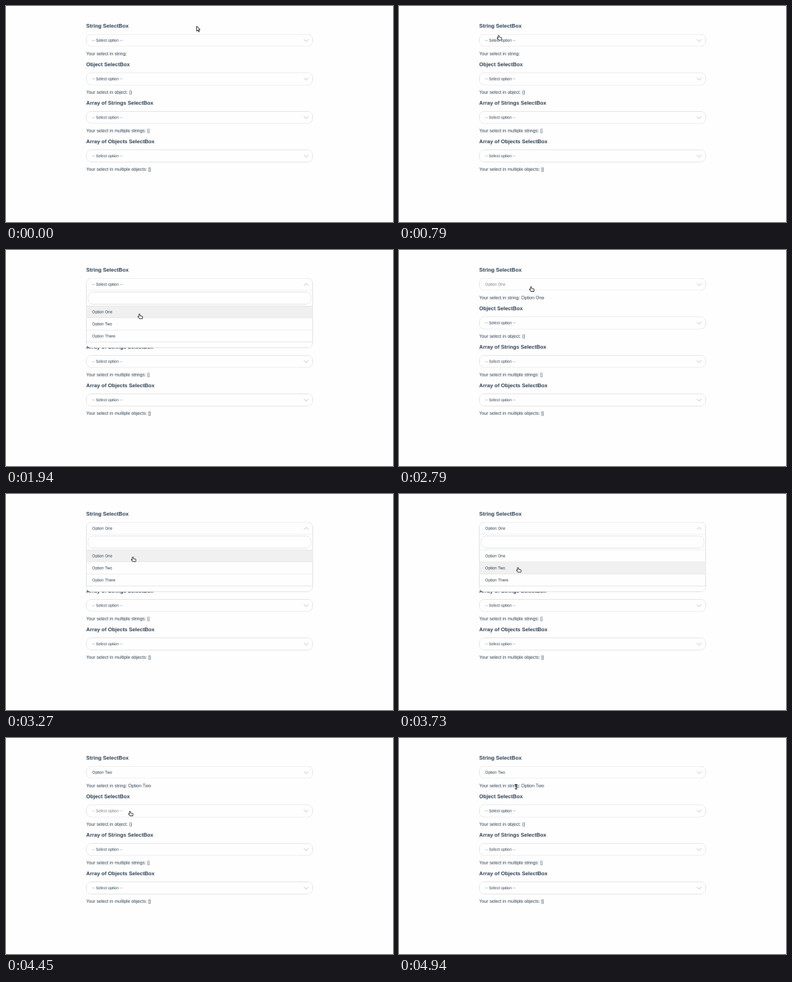
Animation of 600x337 px, one loop 5000 ms. Source, as an HTML page with a canvas:

```html
<!DOCTYPE html>
<html lang="en">
<head>
<meta charset="utf-8">
<title>Select boxes</title>
<style>
  html, body { margin: 0; width: 100%; height: 100%; overflow: hidden; background: #fefefe; }
  canvas { display: block; width: 600px; height: 337px; }
</style>
</head>
<body>
<canvas id="stage"></canvas>
<script>
// The page is laid out at desktop size, then shrunk to the stage.
const W = 1366, H = 768, LOOP = 5000, TICK = 66;
const PAGE = '#fefefe', INK = '#2c3e50', LINE = '#ccc';
const LEFT = 283.5, WIDTH = 799, TOP = 100.5, BOX_H = 43, PITCH = 137;
const ROW_TOP = 198.5, ROW_H = 43, LIST_END = 347.5;
const EMPTY = '-- Select option --';
const OPTIONS = ['Option One', 'Option Two', 'Option There'];
const FIELDS = [
  ['String SelectBox', 'Your select in string: '],
  ['Object SelectBox', 'Your select in object: {}'],
  ['Array of Strings SelectBox', 'Your select in multiple strings: []'],
  ['Array of Objects SelectBox', 'Your select in multiple objects: []']
];

// Each click opens or closes the first box.
const CLICKS = [1330, 2390, 3060, 3880];

const HOME = { x: 673, y: 72 };
const MOVES = [
  { from: 60, to: 450, x: 373, y: 105 },
  { from: 450, to: 550, x: 355, y: 87 },
  { from: 610, to: 1060, x: 350, y: 112 },
  { from: 1400, to: 1790, x: 412, y: 178 },
  { from: 1860, to: 1940, x: 471, y: 227 },
  { from: 2000, to: 2210, x: 476, y: 226 },
  { from: 2450, to: 2790, x: 466, y: 130 },
  { from: 3130, to: 3550, x: 433, y: 298 },
  { from: 3560, to: 3730, x: 420, y: 261 },
  { from: 4210, to: 4400, x: 512, y: 266 },
  { from: 4400, to: 4600, x: 378, y: 255 },
  { from: 4600, to: 4730, x: 402, y: 221 },
  { from: 4750, to: 4940, x: 413, y: 173 }
];

const stage = document.getElementById('stage');
const dpr = window.devicePixelRatio || 1;
stage.width = 600 * dpr;
stage.height = 337 * dpr;
const out = stage.getContext('2d');
out.imageSmoothingQuality = 'medium';

const page = document.createElement('canvas');
page.width = W;
page.height = H;
const ctx = page.getContext('2d');

const hand = new Path2D('M-2 2Q0-1 2 2L2 7L9 8Q11 9 11 11L10 17L0 17L-5 11Q-6 8-3 9L-2 10Z');
const arrow = new Path2D('M0 0L0 17L4 13.5L7 20L10 18.5L7 12.5L12 12Z');
const beam = new Path2D('M-4-8L-1-8L0-7L1-8L4-8M0-7L0 7M-4 8L-1 8L0 7L1 8L4 8');

const clamp = u => Math.max(0, Math.min(1, u));

function pointerAt(t) {
  let p = HOME;
  for (const m of MOVES) {
    if (t < m.from) break;
    const span = m.to - m.from, steps = Math.round(span / TICK);
    const u = clamp(Math.floor((t - m.from) / span * steps + 0.3) / steps);
    const k = 1 - (1 - u) ** 2;
    p = { x: p.x + (m.x - p.x) * k, y: p.y + (m.y - p.y) * k };
  }
  return p;
}

// Half turns of the first chevron, one per click
function chevronTurn(t) {
  return CLICKS.reduce((sum, click) => {
    const u = clamp((Math.floor((t - click) / 60) * 60 - 20) / 160);
    return sum + u * u * (3 - 2 * u);
  }, 0);
}

function boxAt(p) {
  if (p.x < LEFT || p.x > LEFT + WIDTH) return -1;
  return FIELDS.findIndex((_, i) => p.y >= TOP + i * PITCH && p.y <= TOP + i * PITCH + BOX_H);
}

function text(s, x, y, size, color, weight = 'normal') {
  ctx.font = `${weight} ${size}px "Liberation Sans", Arial, sans-serif`;
  ctx.fillStyle = color;
  ctx.fillText(s, x, y);
  return ctx.measureText(s).width;
}

function pill(x, y, w, h) {
  ctx.beginPath();
  ctx.roundRect(x, y, w, h, 18);
  ctx.fillStyle = PAGE;
  ctx.fill();
  ctx.strokeStyle = LINE;
  ctx.lineWidth = 1;
  ctx.stroke();
}

function rule(y) {
  ctx.beginPath();
  ctx.moveTo(LEFT, y);
  ctx.lineTo(LEFT + WIDTH, y);
  ctx.stroke();
}

function chevron(y, turn) {
  ctx.save();
  ctx.translate(1059.5, y);
  ctx.rotate(turn * Math.PI);
  ctx.beginPath();
  ctx.moveTo(-8, -4);
  ctx.lineTo(0, 4);
  ctx.lineTo(8, -4);
  ctx.strokeStyle = LINE;
  ctx.lineWidth = 2;
  ctx.stroke();
  ctx.restore();
}

function dropdown(p) {
  pill(LEFT, TOP, WIDTH, LIST_END - TOP);
  rule(TOP + BOX_H);
  pill(289.5, 149.5, 787, 43);
  OPTIONS.forEach((name, i) => {
    const y = ROW_TOP + i * ROW_H;
    if (p.y >= y && p.y < y + ROW_H) {
      ctx.fillStyle = '#f0f0f0';
      ctx.fillRect(LEFT, y, WIDTH, ROW_H);
    }
    text(name, 304, y + 26.5, 14, INK);
  });
  for (let i = 0; i <= OPTIONS.length; i++) rule(ROW_TOP + i * ROW_H);
}

function pointerShape(p, open, widths) {
  if (open && p.y >= TOP && p.y <= LIST_END) return p.y > 149 && p.y < 193 ? beam : hand;
  if (boxAt(p) >= 0) return hand;
  const overText = widths.some(([head, note], i) => {
    const x = p.x - LEFT, y = p.y - i * PITCH;
    return (x < head && y > 60 && y < 82) || (x < note && y > 159 && y < 180);
  });
  return overText ? beam : arrow;
}

function drawPointer(p, shape) {
  ctx.save();
  ctx.translate(p.x, p.y);
  ctx.lineJoin = 'round';
  ctx.strokeStyle = '#111';
  ctx.lineWidth = 1.8;
  if (shape !== beam) {
    ctx.fillStyle = '#fff';
    ctx.fill(shape);
  }
  ctx.stroke(shape);
  ctx.restore();
}

function draw(t) {
  const p = pointerAt(t);
  const clicks = CLICKS.filter(c => t >= c).length;
  const open = clicks % 2 === 1;
  const choice = clicks < 2 ? '' : OPTIONS[Math.floor(clicks / 2) - 1];
  const hovered = open ? -1 : boxAt(pointerAt(t - TICK));

  ctx.fillStyle = PAGE;
  ctx.fillRect(0, 0, W, H);
  const widths = FIELDS.map(([head, note], i) => {
    const y = i * PITCH;
    pill(LEFT, TOP + y, WIDTH, BOX_H);
    return [
      text(head, 283, 77 + y, 18.72, INK, 'bold'),
      text(note + (i ? '' : choice), 283, 175 + y, 16, INK)
    ];
  });
  if (open) dropdown(p);
  FIELDS.forEach((_, i) => {
    if (open && i === 1) return;
    const y = i * PITCH;
    const label = i === 0 && choice || EMPTY;
    text(label, 304, 127 + y, 14, hovered === i ? '#808080' : INK);
    chevron(122.5 + y, i ? 0 : chevronTurn(t));
  });
  drawPointer(p, pointerShape(p, open, widths));
  out.drawImage(page, 0, 0, stage.width, stage.height);
}

const start = performance.now();
function tick() {
  draw((performance.now() - start) % LOOP);
  requestAnimationFrame(tick);
}
tick();
</script>
</body>
</html>
```
